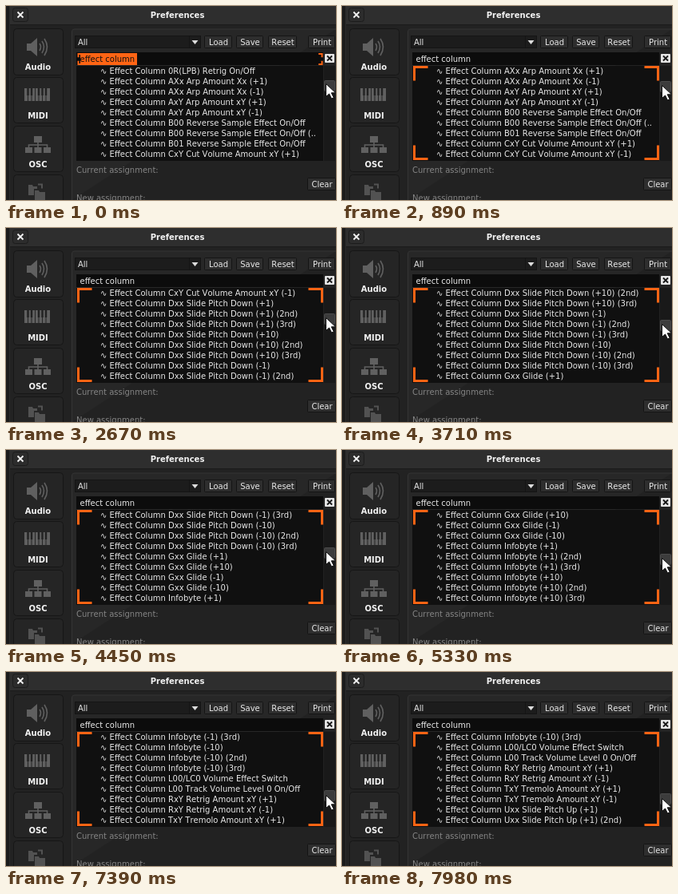
Write an HTML page that moves like this. It is 413 px wide and 243 px high and loops after 8 s.

```html
<!DOCTYPE html>
<html lang="en">
<head>
<meta charset="utf-8">
<title>Preferences</title>
<style>
  html, body { margin: 0; width: 100%; height: 100%; overflow: hidden; background: #1b1b1b; }
  svg { display: block; width: 413px; height: 243px; }
  text { font: 10px "DejaVu Sans", sans-serif; font-kerning: none; fill: #e8e8e8; white-space: pre; }
  .bold { font-weight: bold; text-anchor: middle; fill: #f2f2f2; }
  .dim { fill: #858585; }
  .box { fill: #2e2e2e; stroke: #141414; }
  .tab { fill: #252525; stroke: #161616; }
  .icon { fill: #606060; }
  .line { fill: none; stroke: #606060; stroke-width: 1.6; }
</style>
</head>
<body>
<svg viewBox="0 0 413 243">
  <rect width="413" height="243" fill="#222"/>
  <rect width="413" height="24" fill="#2e2e2e"/>
  <path d="M4 23.5H413" stroke="#1a1a1a"/>
  <rect width="4" height="243" fill="#1b1b1b"/>
  <path d="M4.5 0V243" stroke="#2a2a2a"/>
  <rect x="8.5" y="2.5" width="19" height="17" rx="3" fill="#2c2c2c" stroke="#1c1c1c"/>
  <path d="M14.5 7.5l7 7m0-7l-7 7" stroke="#f2f2f2" stroke-width="1.8"/>
  <text class="bold" x="214.5" y="15">Preferences</text>

  <rect class="tab" x="9.5" y="28.5" width="62" height="58" rx="4"/>
  <rect class="tab" x="9.5" y="89.5" width="62" height="57" rx="4"/>
  <rect class="tab" x="9.5" y="150.5" width="62" height="57" rx="4"/>
  <rect class="tab" x="9.5" y="211.5" width="62" height="57" rx="4"/>
  <text class="bold" x="40" y="80">Audio</text>
  <text class="bold" x="40" y="141">MIDI</text>
  <text class="bold" x="40" y="202">OSC</text>

  <path class="icon" d="M26 47h5l8-7v23l-8-7h-5z"/>
  <path class="line" d="M42 47q3 4 0 9M45 44q5 7 0 15M48 41q7 10 0 21"/>
  <path class="icon" d="M23 103h32v16h-32z"/>
  <path d="M27.5 103v16m4.5 0v-16m4.5 0v16m4.5 0v-16m4.5 0v16m4.5 0v-16" stroke="#252525"/>
  <path d="M27.5 103v9m4.5 0v-9m9 0v9m4.5 0v-9m4.5 0v9" stroke="#222" stroke-width="2.4"/>
  <path class="icon" d="M35 163h10v8h-10zM24 177h9v7h-9zM35.5 177h9v7h-9zM47 177h9v7h-9z"/>
  <path class="line" d="M40 171v6M28.5 177v-3h23v3"/>
  <path d="M28 224h5l1 2h5v3h-4v8h-7zM36 231h5l1 2h7v10h-13z" fill="#525252"/>
  <path d="M40 223.5h5v5" fill="none" stroke="#525252" stroke-width="2"/>

  <path d="M82.5 243V32q0-3 3-3H413" fill="#272727" stroke="#343434"/>
  <rect class="box" x="86.5" y="37.5" width="157" height="15" style="fill:#1c1c1c"/>
  <path d="M229.5 38v14" stroke="#141414"/>
  <path d="M232.5 43h8l-4 5z" fill="#ddd"/>
  <text x="90" y="49">All</text>
  <g id="buttons"></g>

  <rect x="88" y="58" width="309" height="16" fill="#0c0c0c"/>
  <rect x="88" y="75" width="309" height="119" fill="#101010"/>
  <rect x="398" y="75" width="14" height="119" fill="#191919"/>
  <rect x="399" y="60" width="12" height="11" rx="1" fill="#e4e4e4"/>
  <path d="M402 62.5l6 6m0-6l-6 6" stroke="#151515" stroke-width="1.8"/>
  <rect id="selection" x="93" y="59" width="71" height="15" fill="#ff6414"/>
  <text id="query" x="92.5" y="70">effect column</text>
  <g id="rows"></g>
  <path id="focus" fill="none" stroke="#ff6414"/>

  <text class="dim" x="88" y="209">Current assignment:</text>
  <text class="dim" x="88" y="244">New assignment:</text>

  <rect id="thumb" x="398.5" width="13" height="13" rx="1" fill="#3c3c3c" stroke="#4a4a4a"/>
  <path id="cursor" d="M0 0V16l4-3.5 3 6 2.7-1.2-3-6H12z" fill="#fff" stroke="#111"/>
</svg>
<script>
const $ = id => document.getElementById(id);
const LOOP = 8000, VISIBLE = 9, ROW = 13;

const ordinals = name => [name, name + " (2nd)", name + " (3rd)"];
const vary = (name, ...steps) => steps.map(s => `${name} (${s})`);
const triple = (name, ...steps) => vary(name, ...steps).flatMap(ordinals);
const pair = name => vary(name, "+1", "-1");
const reverse = "Reverse Sample Effect On/Off";

const items = [
  "0R(LPB) Retrig On/Off",
  ...pair("AXx Arp Amount Xx"),
  ...pair("AxY Arp Amount xY"),
  "B00 " + reverse, `B00 ${reverse} (..`, "B01 " + reverse,
  ...pair("CxY Cut Volume Amount xY"),
  ...triple("Dxx Slide Pitch Down", "+1", "+10", "-1", "-10"),
  ...vary("Gxx Glide", "+1", "+10", "-1", "-10"),
  ...triple("Infobyte", "+1", "+10", "-1", "-10"),
  "L00/LC0 Volume Effect Switch",
  "L00 Track Volume Level 0 On/Off",
  ...pair("RxY Retrig Amount xY"),
  ...pair("TxY Tremolo Amount xY"),
  ...triple("Uxx Slide Pitch Up", "+1")
];

// Scroll drags: start ms, end ms, steps, first position, last position
const drags = [
  [890, 890, 1, 1, 1], [1190, 1340, 2, 2, 3], [1640, 1780, 2, 4, 5],
  [2230, 2370, 2, 6, 7.5], [2670, 2670, 1, 9, 9], [2970, 2970, 1, 10, 10],
  [3270, 3850, 5, 11, 15], [4150, 5030, 7, 16, 22], [5330, 5780, 4, 23, 26],
  [6080, 6660, 5, 27, 31], [6810, 7980, 9, 31.67, 37]
];

function scrollAt(t) {
  let pos = 0;
  for (const [start, end, steps, from, to] of drags) {
    if (t < start) break;
    const last = steps - 1;
    const k = last ? Math.min(last, Math.floor((t - start) / (end - start) * last + 0.05)) : 0;
    pos = last ? from + (to - from) * k / last : from;
  }
  return pos;
}

// Four corner brackets around a box
function corners(left, top, right, bottom) {
  const a = Math.min(17, (bottom - top) / 3);
  const corner = (x, y, dx, dy) => `M${x} ${y + dy * a}V${y}H${x + dx * a}`;
  return corner(left, top, 1, 1) + corner(right, top, -1, 1) +
         corner(left, bottom, 1, -1) + corner(right, bottom, -1, -1);
}

function add(parent, tag, attrs, text = "") {
  const el = document.createElementNS("http://www.w3.org/2000/svg", tag);
  for (const key in attrs) el.setAttribute(key, attrs[key]);
  el.textContent = text;
  return parent.appendChild(el);
}

for (const [label, x, w, y] of [
  ["Load", 249, 34, 37], ["Save", 289, 33, 37], ["Reset", 329, 35, 37],
  ["Print", 379, 33, 37], ["Clear", 378, 35, 215]
]) {
  add($("buttons"), "rect", { class: "box", x: x - 0.5, y: y + 0.5, width: w, height: 15, rx: 1 });
  add($("buttons"), "text", { x: x + w / 2, y: y + 12, "text-anchor": "middle" }, label);
}

const lines = Array.from({ length: VISIBLE }, (_, i) =>
  add($("rows"), "text", { x: 118, y: 85 + i * ROW }));

function draw(now) {
  const t = now % LOOP;
  const pos = scrollAt(t), top = Math.round(pos);
  lines.forEach((line, i) => {
    const text = "∿ Effect Column " + items[top + i];
    if (line.textContent !== text) line.textContent = text;
  });
  const shift = t < 150 ? 0 : t < 290 ? 0.6 : 1;
  $("focus").setAttribute("d", corners(90.5, 60 + 16.5 * shift, 395.5, 73 + 118.5 * shift));
  $("focus").setAttribute("stroke-width", 2 + shift);
  $("selection").style.display = shift ? "none" : "";
  $("query").style.fill = shift ? "" : "#111";
  $("thumb").setAttribute("y", Math.round(92.5 + pos * 1.62) + 0.5);
  $("cursor").setAttribute("transform", `translate(400.5 ${Math.round(97 + pos * 1.66) + 0.5})`);
}

const begin = performance.now();
function tick() {
  draw(performance.now() - begin);
  requestAnimationFrame(tick);
}
tick();
</script>
</body>
</html>
```
